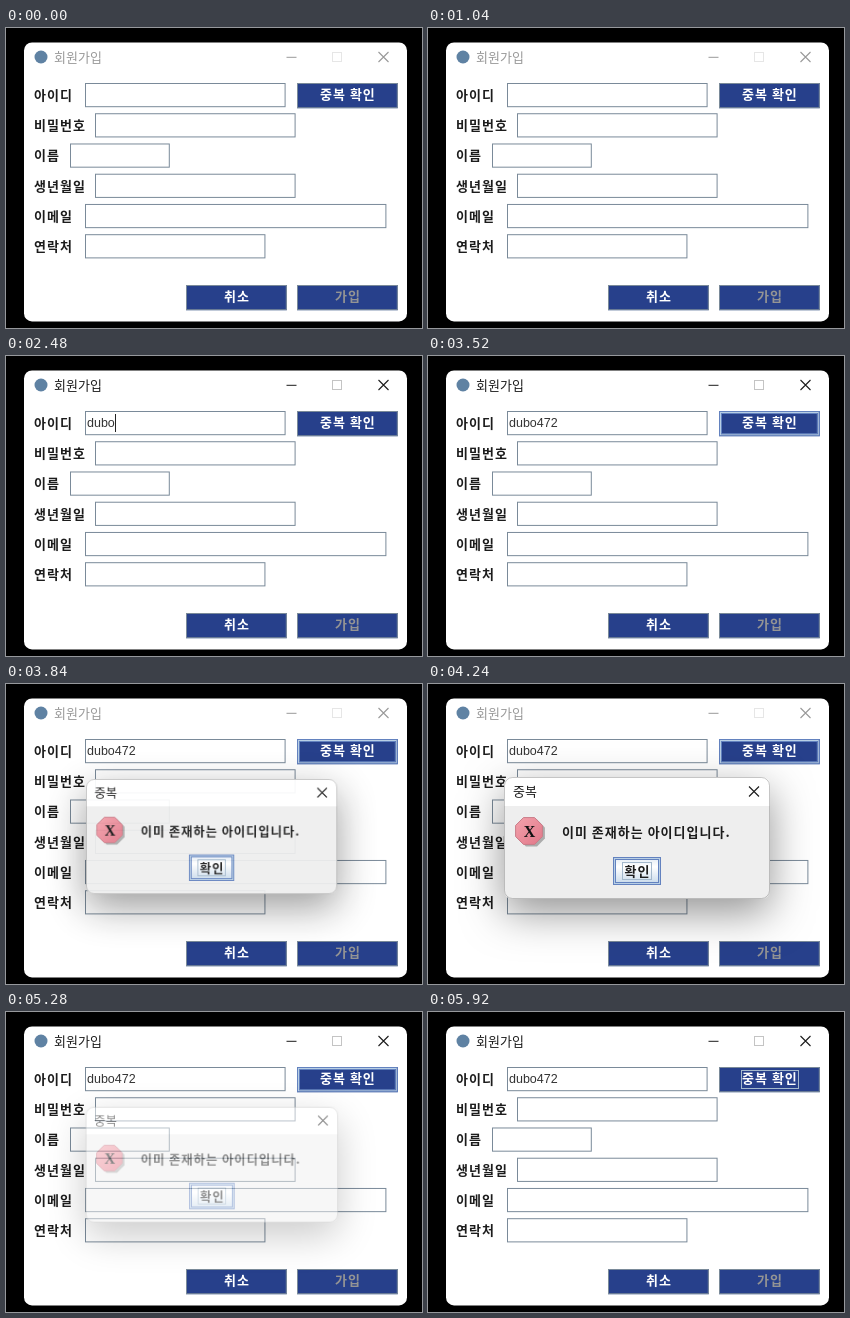
Recreate the animation shown at these times as an HTML page with a canvas. Size 416 by 300 pixels, loop 6000 ms.

```html
<!DOCTYPE html>
<html lang="ko">
<head>
<meta charset="utf-8">
<title>회원가입</title>
<style>
html, body { margin: 0; width: 100%; height: 100%; overflow: hidden; background: #000; }
canvas { display: block; width: 416px; height: 300px; }
</style>
</head>
<body>
<canvas id="stage" width="416" height="300"></canvas>
<script>
const W = 416, H = 300, LOOP = 6000;
const KR = '"Noto Sans CJK KR", "Noto Sans CJK", sans-serif';
const NAVY = '#27408b', EDGE = '#7a8a99', BLUE = '#6382bf', PALE = '#b8cfe5', INK = '#1c1c1c';
const USER_ID = 'dubo472';

const FOCUS = 1200, HOVER = 3360, CLICK = 3680;
const OPEN = 3760, OPEN_MS = 240, CLOSE = 5200, CLOSE_MS = 160;
const KEYS = [1840, 2000, 2160, 2320, 2640, 2800, 2960];

// The form is laid out in its own units, drawn slightly enlarged.
const UNIT = 1.008, TOP = 55, ROW = 30 * UNIT;
const FIELDS = [
  ['아이디', 79, 200], ['비밀번호', 89, 200], ['이름', 64, 100],
  ['생년월일', 89, 200], ['이메일', 79, 300], ['연락처', 79, 180]
];

const screen = document.getElementById('stage').getContext('2d');
const layer = document.createElement('canvas');
layer.width = W;
layer.height = H;
const popup = layer.getContext('2d');

const clamp = v => Math.max(0, Math.min(1, v));
const easeOut = p => 1 - (1 - p) ** 3;

function text(c, str, x, y, color, { font = 'bold 13px ' + KR, gap = 0, align = 'left' } = {}) {
  c.font = font;
  c.letterSpacing = gap + 'px';
  c.textAlign = align;
  c.fillStyle = color;
  c.fillText(str, x, y);
}

const label = (c, str, x, y, color = INK) => text(c, str, x, y, color, { gap: 1 });
const caption = (c, str, x, y, color) => text(c, str, x, y, color, { font: '13px ' + KR });
const centered = (c, str, x, y, color) => text(c, str, x + 0.5, y, color, { gap: 1, align: 'center' });

function frame(c, x, y, w, h, color) {
  c.strokeStyle = color;
  c.lineWidth = 1;
  c.strokeRect(x + 0.5, y + 0.5, w - 1, h - 1);
}

function hoverFrame(c, x, y, w, h) {
  [BLUE, PALE, BLUE].forEach((color, i) => frame(c, x + i, y + i, w - 2 * i, h - 2 * i, color));
}

function rounded(c, x, y, w, h, r) {
  c.beginPath();
  c.roundRect(x, y, w, h, r);
}

const windowShape = c => rounded(c, 18, 14.4, 383, 279, 8);

function cross(c, x, y, size, color) {
  c.strokeStyle = color;
  c.lineWidth = 1.1;
  c.beginPath();
  c.moveTo(x, y);
  c.lineTo(x + size, y + size);
  c.moveTo(x + size, y);
  c.lineTo(x, y + size);
  c.stroke();
}

function button(c, str, x, y, color, hover, focused) {
  const w = 100 * UNIT, h = 25 * UNIT;
  c.fillStyle = NAVY;
  c.fillRect(x, y, w, h);
  if (hover) hoverFrame(c, x, y, w, h);
  else frame(c, x, y, w, h, EDGE);
  centered(c, str, x + w / 2, y + 16, color);
  if (focused) frame(c, x + 22, y + 3, 58, 19, '#a3b8cc');
}

function titleBar(c, active) {
  const ink = active ? INK : '#999';
  c.fillStyle = '#5f82a3';
  c.beginPath();
  c.arc(35, 29, 6.5, 0, 7);
  c.fill();
  caption(c, '회원가입', 48, 33.5, ink);
  c.fillStyle = ink;
  c.fillRect(280.5, 28.8, 10, 1);
  frame(c, 326, 24, 10, 10, active ? '#c4c4c4' : '#e6e6e6');
  cross(c, 372.5, 24, 10, ink);
}

function caretOn(t) {
  if (t < FOCUS || t >= CLICK) return false;
  const last = KEYS.filter(k => k <= t).pop() || FOCUS;
  return (t - last) % 1000 < 500;
}

function form(c, t) {
  c.fillStyle = '#000';
  c.fillRect(0, 0, W, H);
  c.fillStyle = '#fff';
  windowShape(c);
  c.fill();
  titleBar(c, t >= FOCUS && (t < OPEN || t >= CLOSE));

  FIELDS.forEach(([name, x, w], i) => {
    const y = TOP + i * ROW;
    label(c, name, 28, Math.round(y) + 16.5);
    frame(c, x, y, (w - 1) * UNIT, 24 * UNIT, EDGE);
  });

  const typed = USER_ID.slice(0, KEYS.filter(k => k <= t).length);
  text(c, typed, 81, 71, '#333', { font: '12.5px "Liberation Sans", Arial, sans-serif' });
  if (caretOn(t)) {
    c.fillStyle = '#222';
    c.fillRect(Math.round(81 + c.measureText(typed).width), 58, 1, 18);
  }

  const hover = t >= HOVER && t < CLOSE + CLOSE_MS;
  button(c, '중복 확인', 291, TOP, '#fff', hover, t >= CLOSE + CLOSE_MS);
  button(c, '취소', 180, 257, '#fff');
  button(c, '가입', 291, 257, '#949494');
}

function octagon(c, x, y, r) {
  c.beginPath();
  for (let i = 0; i < 8; i++) {
    const a = (i + 0.5) * Math.PI / 4;
    c.lineTo(x + r * Math.cos(a), y + r * Math.sin(a));
  }
  c.closePath();
}

function errorIcon(c) {
  c.fillStyle = 'rgba(90,90,90,.45)';
  octagon(c, 103.5, 149, 14.5);
  c.fill();
  const red = c.createLinearGradient(88, 133, 114, 160);
  red.addColorStop(0, '#f3a3ac');
  red.addColorStop(1, '#e2788a');
  c.fillStyle = red;
  octagon(c, 101, 147, 14.5);
  c.fill();
  c.strokeStyle = '#c97c88';
  c.lineWidth = 1;
  c.stroke();
  text(c, 'X', 101.5, 152.5, '#111', { font: 'bold 16px "Liberation Serif", serif', align: 'center' });
}

function dialog(c) {
  c.clearRect(0, 0, W, H);
  c.save();
  c.shadowColor = 'rgba(0,0,0,.42)';
  c.shadowBlur = 42;
  c.shadowOffsetY = 14;
  c.fillStyle = '#eee';
  rounded(c, 76, 93, 266, 122, 8);
  c.fill();
  c.restore();
  c.fillStyle = '#fff';
  rounded(c, 76, 93, 266, 29, [8, 8, 0, 0]);
  c.fill();
  c.strokeStyle = 'rgba(110,110,110,.4)';
  c.lineWidth = 1;
  rounded(c, 76.5, 93.5, 265, 121, 8);
  c.stroke();

  caption(c, '중복', 85, 112, INK);
  cross(c, 321, 102.5, 10, INK);
  errorIcon(c);
  label(c, '이미 존재하는 아이디입니다.', 134, 152.5);

  const sheen = c.createLinearGradient(0, 173, 0, 201);
  sheen.addColorStop(0, '#dfe9f3');
  sheen.addColorStop(0.35, '#fff');
  sheen.addColorStop(1, '#c4d7e9');
  c.fillStyle = sheen;
  c.fillRect(185, 173, 48, 28);
  hoverFrame(c, 185, 173, 48, 28);
  frame(c, 194, 178, 30, 18, '#a3b8cc');
  centered(c, '확인', 209, 191.5, INK);
}

function showDialog(c, t) {
  if (t < OPEN || t >= CLOSE + CLOSE_MS) return;
  const p = easeOut(clamp((t - OPEN) / OPEN_MS));
  const q = clamp((t - CLOSE) / CLOSE_MS);
  const scale = 1 - 0.19 * (1 - p) - 0.1 * q;
  dialog(popup);
  c.save();
  c.globalAlpha = Math.min(1, p * 1.31) * (1 - q);
  windowShape(c);
  c.clip();
  c.translate(147, 128);
  c.scale(scale, scale);
  c.drawImage(layer, -147, -128);
  c.restore();
}

function render() {
  const t = performance.now() % LOOP;
  form(screen, t);
  showDialog(screen, t);
  requestAnimationFrame(render);
}
render();
</script>
</body>
</html>
```
